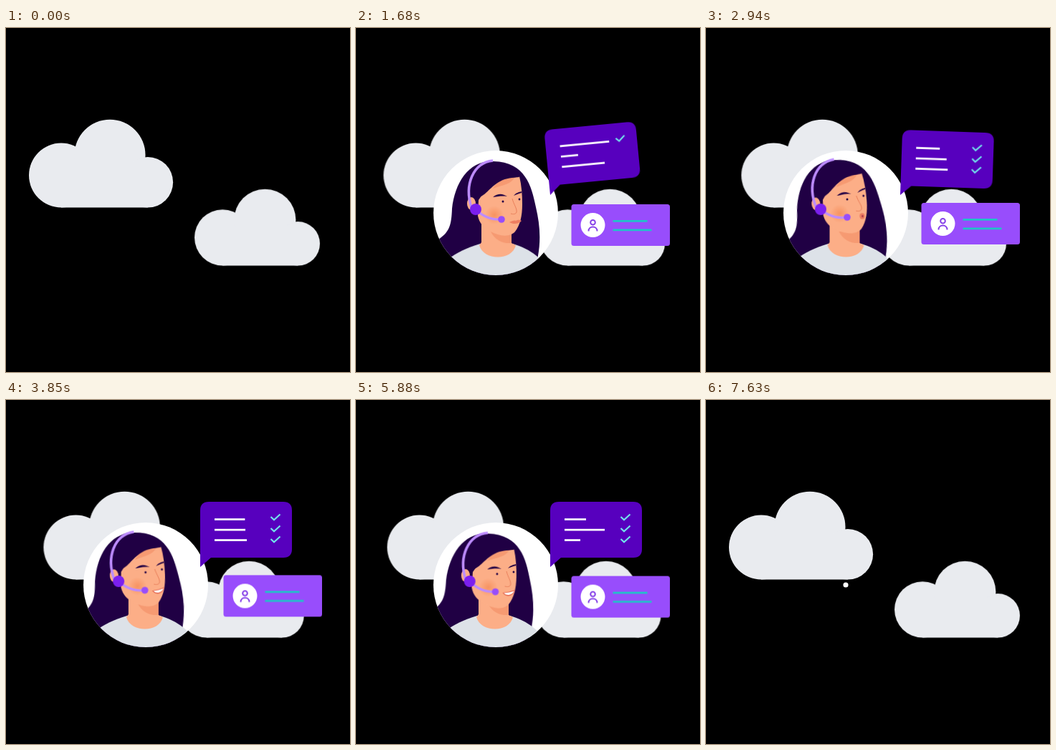
These frames come from a looping animation (480 px wide and 480 px high, 7.7 s). An HTML page:

```html
<!DOCTYPE html>
<html lang="en">
<head>
<meta charset="utf-8">
<title>Support chat</title>
<style>
html, body { margin: 0; width: 100%; height: 100%; overflow: hidden; background: #000; }
svg { display: block; width: 100vw; height: 100vh; }

/* every moving part shares one 7.7 s loop */
.drift, .drift-back, .disc, .rise, .head, .body, .bubble, .card, .l1, .l2, .l3,
.tick, .lips, .pout, .smile { animation: 7.7s ease-in-out infinite; }

.drift { animation-name: drift; --shift: 20.6px; }
.drift.far { --shift: -22.5px; }
@keyframes drift {
  0% { transform: none; animation-timing-function: cubic-bezier(.5,0,.5,1); }
  54.5%, 56.5% { transform: translateX(var(--shift)); animation-timing-function: cubic-bezier(.5,0,.5,1); }
  98.7%, 100% { transform: none; }
}

.disc { animation-name: disc; }
@keyframes disc {
  0%, 1.8% { r: 0px; animation-timing-function: cubic-bezier(.33,0,.15,1); }
  22.7%, 85.7% { r: 87px; animation-timing-function: cubic-bezier(.4,0,.7,.85); }
  100% { r: 0px; }
}
.rise { animation-name: rise; }
@keyframes rise {
  0%, 1.8% { transform: translateY(87px); animation-timing-function: cubic-bezier(.33,0,.15,1); }
  22.7%, 85.7% { transform: none; animation-timing-function: cubic-bezier(.4,0,.7,.85); }
  100% { transform: translateY(87px); }
}

.head { animation-name: head; transform-origin: 167px 253px; }
@keyframes head {
  0%, 11.8% { transform: rotate(-2deg); }
  21.8% { transform: rotate(0deg); }
  38.2% { transform: translateX(-7px) rotate(-4.5deg); }
  62.7% { transform: translateX(-13px) rotate(0deg); }
  76.4% { transform: translateX(-8.3px) rotate(1deg); }
  92%, 100% { transform: rotate(0deg); }
}
.body { animation-name: body; }
@keyframes body {
  0%, 21.8% { transform: none; }
  38.2% { transform: translateX(-2.5px); }
  62.7% { transform: translateX(-6px); }
  76.4% { transform: translateX(-4px); }
  92%, 100% { transform: none; }
}

.lips { animation-name: lips; animation-timing-function: step-end; }
.pout { animation-name: pout; animation-timing-function: step-end; }
.smile { animation-name: smile; animation-timing-function: step-end; }
@keyframes lips { 0% { opacity: 1; } 31%, 100% { opacity: 0; } }
@keyframes pout { 0% { opacity: 0; } 31% { opacity: 1; } 47%, 100% { opacity: 0; } }
@keyframes smile { 0% { opacity: 0; } 47%, 100% { opacity: 1; } }

.bubble { animation-name: bubble; transform-origin: 271px 233px; }
@keyframes bubble {
  0%, 4.5% { transform: rotate(-20deg) scale(0); }
  11.8% { transform: rotate(8.2deg) scale(.94); animation-timing-function: ease-out; }
  13.5% { transform: rotate(9deg) scale(1); }
  22.4% { transform: rotate(-5.6deg) scale(1); }
  33.1% { transform: rotate(3.2deg) scale(1); }
  44.8%, 86% { transform: rotate(0deg) scale(1); }
  96%, 100% { transform: rotate(-20deg) scale(0); }
}
.l1 { animation-name: l1; }
.l2 { animation-name: l2; }
.l3 { animation-name: l3; }
@keyframes l1 {
  0%, 8% { width: 0; } 11.8% { width: 30px; } 21.8% { width: 69px; }
  38.2% { width: 33px; } 62.7% { width: 53px; } 76.4%, 100% { width: 30px; }
}
@keyframes l2 {
  0%, 10.5% { width: 0; } 11.8% { width: 8px; } 21.8% { width: 24px; }
  38.2%, 62.7% { width: 43px; } 76.4%, 100% { width: 56px; }
}
@keyframes l3 {
  0%, 12.5% { width: 0; } 21.8% { width: 60px; }
  38.2%, 62.7% { width: 45px; } 76.4%, 100% { width: 22px; }
}
.tick { animation-name: tick1; fill: none; stroke: #72e6ec; stroke-width: 2.1; stroke-dasharray: 18; }
.tick.b { animation-name: tick2; }
.tick.c { animation-name: tick3; }
@keyframes tick1 { 0%, 19% { stroke-dashoffset: 18; } 22.4%, 100% { stroke-dashoffset: 0; } }
@keyframes tick2 { 0%, 23.5% { stroke-dashoffset: 18; } 27%, 100% { stroke-dashoffset: 0; } }
@keyframes tick3 { 0%, 28% { stroke-dashoffset: 18; } 31.5%, 100% { stroke-dashoffset: 0; } }

.card { animation-name: card; transform-origin: 369px 275px; }
@keyframes card {
  0%, 9% { transform: translateY(40px) scale(.79); opacity: 0; }
  11.8% { transform: translate(2px,32.5px) scale(.83); opacity: .22; animation-timing-function: cubic-bezier(.3,.2,.3,1); }
  20.5%, 21.8% { transform: none; opacity: 1; }
  38.2% { transform: translateY(-2px); }
  50% { transform: translate(3px,-1.6px); }
  62.7% { transform: translate(2px,-1px); }
  76.4%, 86% { transform: translateY(-.4px); opacity: 1; }
  95%, 100% { transform: translateY(40px) scale(.79); opacity: 0; }
}
</style>
</head>
<body>
<svg viewBox="0 0 480 480">
  <defs>
    <g id="cloud" fill="#e9ebef">
      <circle cx="77" cy="205.5" r="45"/>
      <circle cx="145" cy="177.3" r="49.5"/>
      <circle cx="197.8" cy="215.3" r="35.3"/>
      <path d="M77 190H180L197.800 215V250.600H77Z"/>
    </g>
    <clipPath id="porthole"><circle class="disc" cx="195" cy="258" r="0"/></clipPath>
    <radialGradient id="blush">
      <stop offset="0" stop-color="#f58a55" stop-opacity=".75"/>
      <stop offset="1" stop-color="#f58a55" stop-opacity="0"/>
    </radialGradient>
  </defs>

  <g class="drift"><use href="#cloud"/></g>
  <g class="drift far"><use href="#cloud" transform="translate(235.200 113.600) scale(.87)"/></g>

  <circle class="disc" cx="195" cy="258" r="0" fill="#fff"/>
  <g clip-path="url(#porthole)">
    <g class="rise">
      <g class="head">
        <path fill="#200044" d="M192 186C158 184 138 215 134 252C133 275 131 285 112 297L125 350H245C260 310 258 280 251 250C245 220 236 187 192 186Z"/>
      </g>
      <g class="body">
        <path fill="#dde2e8" d="M100 350C118 330 135 312 173 301H219C243 308 262 322 280 350V440H100Z"/>
        <path fill="#fcae87" d="M175 255H217V300L223 303C218 325 178 325 172 303L175 299Z"/>
        <path fill="#f69a72" d="M188 284L217 282V300C205 301 194 296 188 284Z"/>
      </g>
      <g class="head">
        <path fill="#fcae87" d="M171 240L190 212L228 207C231 220 232 232 232 246C232 262 229 275 222 284C214 293 199 290 188 284C178 279 172 272 170 262Z"/>
        <path fill="#f69a72" d="M228 207L207 209C199 214 195 217 191 224C205 219 216 218 221 209Z"/>
        <circle cx="193" cy="261" r="13" fill="url(#blush)"/>
        <path fill="#200044" d="M190 187C165 190 152 215 156 242L168 237C180 236 186 222 201 214C210 209 218 209 228 208C223 194 211 187 190 187Z"/>
        <ellipse cx="161" cy="245" rx="6" ry="9" fill="#fcae87"/>
        <g fill="#200044">
          <path d="M191 236C198 230 205 231 211 235C204 234 198 235 191 236Z"/>
          <path d="M220 234C223 230 227 229 231 228V230C227 231 224 232 220 234Z"/>
          <circle cx="205" cy="242" r="1.5"/>
          <circle cx="228" cy="239" r="1.4"/>
        </g>
        <path fill="none" stroke="#e9805b" d="M218 238C220 246 225 252 224 257C223 260 219 260 216 259"/>
        <path class="lips" fill="#ee7d60" d="M214 271C218 269 221 268 223 269C226 267 229 268 231 269C227 274 219 274 214 271Z"/>
        <g class="pout">
          <ellipse cx="224" cy="267" rx="3.6" ry="4.2" fill="#ee7d60"/>
          <ellipse cx="224.500" cy="267" rx="1.3" ry="1.6" fill="#a83348"/>
        </g>
        <g class="smile">
          <path fill="#e56d55" d="M213 268C219 267 225 266 230 264C229 273 218 276 213 268Z"/>
          <path fill="#fff" d="M215 268.500C220 268 225 267 229 265.500C227 271 219 273 215 268.500Z"/>
        </g>
        <g fill="none" stroke="#bd8cff">
          <path stroke-width="3.600" d="M191 185C163 188 151 219 161 250"/>
          <path stroke-width="3.200" d="M167 253C177 263 188 268 203 267"/>
        </g>
        <circle cx="167" cy="253" r="8" fill="#7b1fee"/>
        <circle cx="203" cy="267" r="4.800" fill="#984dfa"/>
      </g>
    </g>
  </g>

  <g class="card">
    <rect x="300.500" y="246" width="137.500" height="58" rx="3.500" fill="#984dfc"/>
    <circle cx="330.500" cy="275" r="17" fill="#fff"/>
    <g fill="none" stroke="#8540e8" stroke-width="2">
      <circle cx="330.500" cy="271.200" r="3.300"/>
      <path d="M324.500 283.500C324.500 275.500 336.500 275.500 336.500 283.500"/>
    </g>
    <path stroke="#20c3c8" stroke-width="2.800" d="M358.500 269.300H406.500M358.500 281.800H412.500"/>
  </g>

  <g class="bubble">
    <path fill="#5700be" d="M271 233V154Q271 142 283 142H387Q399 142 399 154V208Q399 220 387 220H286Z"/>
    <g fill="#fff">
      <rect class="l1" x="291" y="165.200" width="0" height="2.700"/>
      <rect class="l2" x="291" y="179.800" width="0" height="2.700"/>
      <rect class="l3" x="291" y="194.200" width="0" height="2.700"/>
    </g>
    <path class="tick" d="M369.500 163L374 167.300L382.500 159.500"/>
    <path class="tick b" d="M369.500 179L374 183.300L382.500 175.500"/>
    <path class="tick c" d="M369.500 194L374 198.300L382.500 190.500"/>
  </g>
</svg>
</body>
</html>
```
